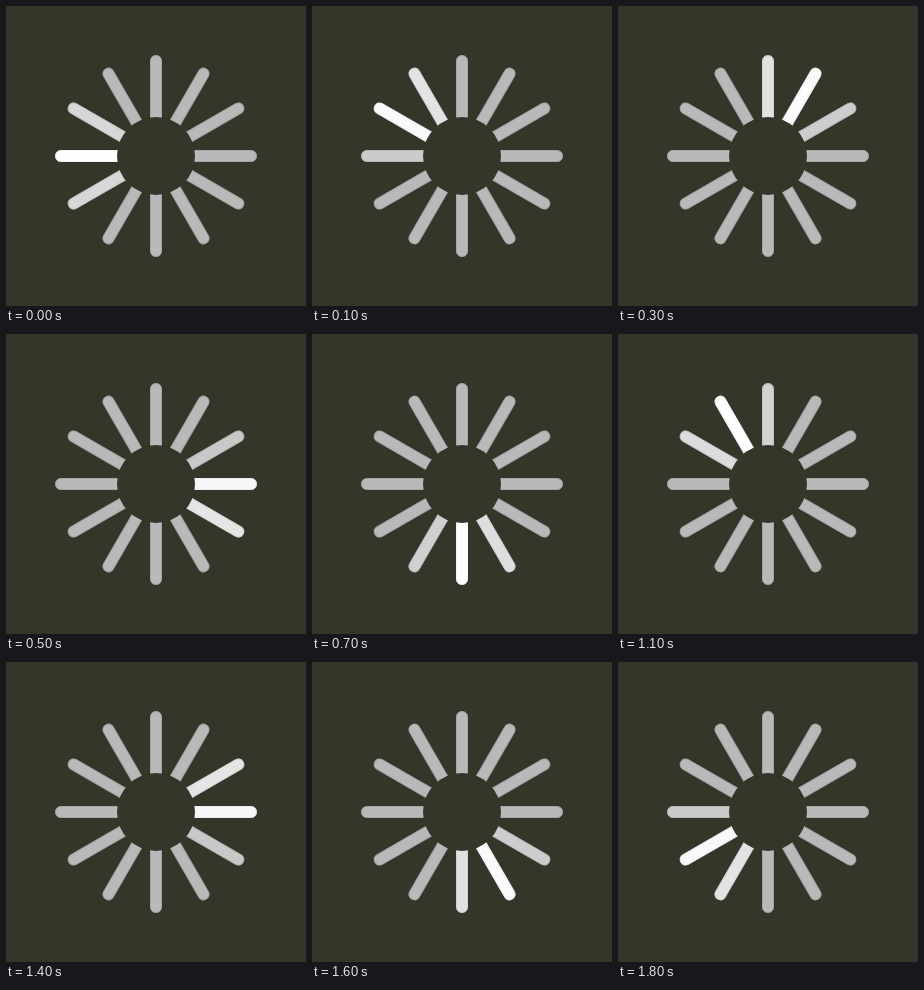
Animation, 300 px wide and 300 px high, one loop 1.9 s. Source, as an HTML page with a canvas:

```html
<!DOCTYPE html>
<html>
<head>
<meta charset="utf-8">
<style>
  html, body { margin: 0; width: 100%; height: 100%; overflow: hidden; background: #353529; }
  canvas { display: block; }
</style>
</head>
<body>
<canvas id="stage" width="300" height="300"></canvas>
<script>
const ctx = document.getElementById('stage').getContext('2d');
const BACKGROUND = '#353529';
const SPOKES = 12, STEPS = 19, STEP_MS = 100, TURNS = 2, START = 9;
const GLOW_REACH = 1.65;

const grey = v => `rgb(${v}, ${v - 1}, ${v})`;

function disc(radius) {
  ctx.beginPath();
  ctx.arc(0, 0, radius, 0, Math.PI * 2);
  ctx.fill();
}

function drawSpoke(index, glow) {
  ctx.save();
  ctx.rotate(index * Math.PI * 2 / SPOKES - Math.PI / 2);
  ctx.beginPath();
  ctx.roundRect(36, -5.5, 64.5, 11, [0, 5.2, 5.2, 0]);
  ctx.fillStyle = grey(Math.round(186 + 69 * glow));
  ctx.fill();
  ctx.strokeStyle = grey(Math.round(166 + 78 * glow));
  ctx.stroke();
  ctx.restore();
}

function draw(now) {
  const step = Math.floor(now / STEP_MS) % STEPS;
  const head = (START + step * TURNS * SPOKES / STEPS) % SPOKES;

  ctx.setTransform(1, 0, 0, 1, 0, 0);
  ctx.fillStyle = BACKGROUND;
  ctx.fillRect(0, 0, 300, 300);
  ctx.translate(150, 150);

  for (let i = 0; i < SPOKES; i++) {
    const gap = Math.abs(i - head);
    const distance = Math.min(gap, SPOKES - gap);
    drawSpoke(i, Math.min(1, 1.1 * Math.max(0, 1 - distance / GLOW_REACH)));
  }

  ctx.fillStyle = grey(168);
  ctx.fillStyle = BACKGROUND;
  disc(39);
}

function tick() {
  draw(performance.now());
  requestAnimationFrame(tick);
}
tick();
</script>
</body>
</html>
```
